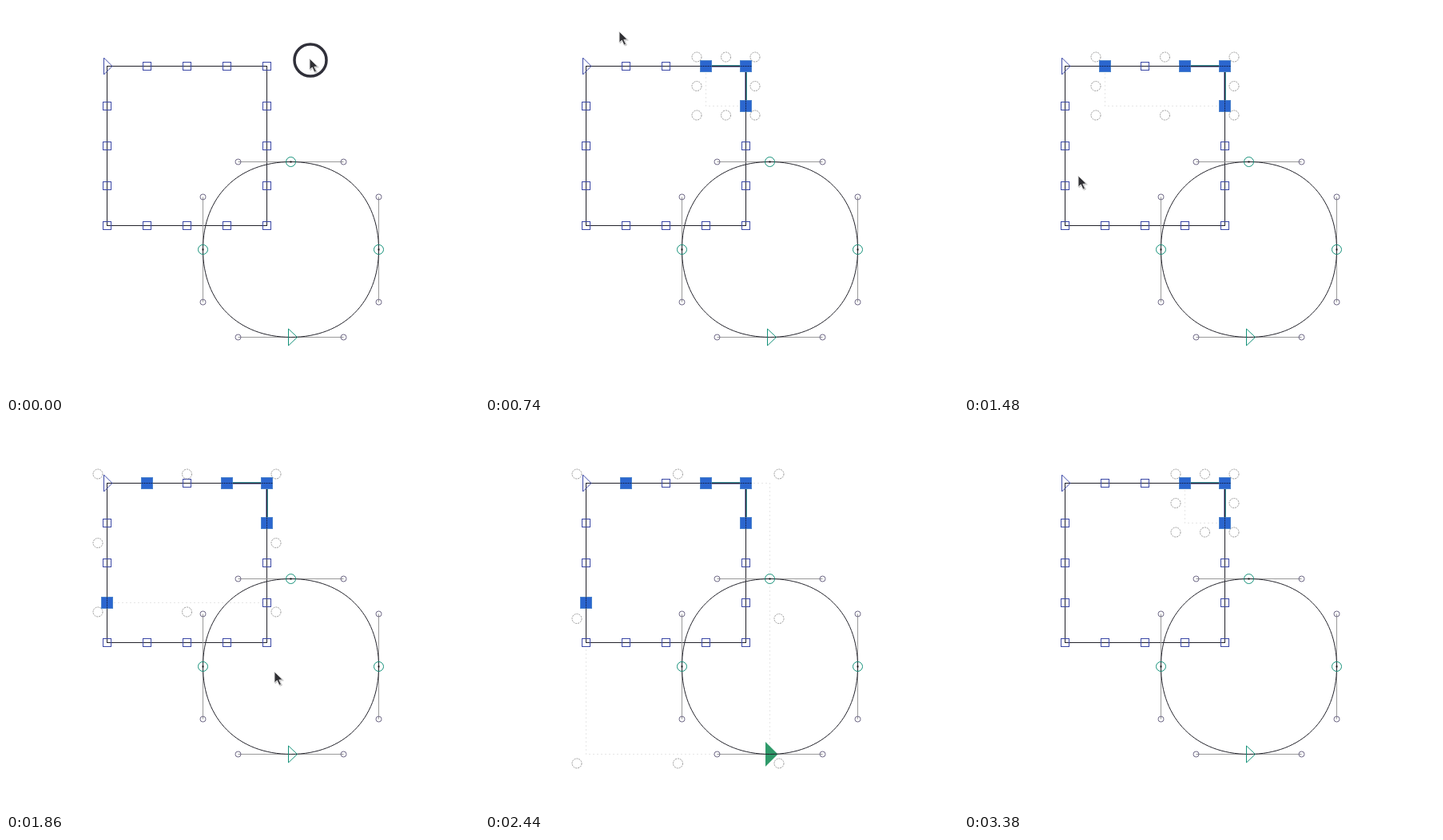
Animation of 592x488 px, one loop 3400 ms. Source, as an HTML page with a canvas:

```html
<!DOCTYPE html>
<html lang="en">
<head>
<meta charset="utf-8">
<title>Node selection</title>
<style>
html, body { margin: 0; width: 100%; height: 100%; overflow: hidden; background: #fff; }
canvas { display: block; width: 592px; height: 488px; }
</style>
</head>
<body>
<canvas id="stage" width="592" height="488"></canvas>
<script>
const ctx = document.getElementById('stage').getContext('2d');
const LOOP = 3400, FRAME = 20;
const BLUE = '#3b48a6', TEAL = '#129078', LINE = '#22222a', GREY = '#999';

const square = { x: 126.5, y: 75.5, step: 50, sides: 4 };
const round = { x: 356.5, y: 305.5, r: 110, handle: 66 };
const size = square.step * square.sides;
const right = square.x + size;

// Nodes in the order they are picked; the drag picks the first three.
const gridNode = (col, row) => [square.x + col * square.step, square.y + row * square.step];
const picks = [gridNode(3, 0), gridNode(4, 0), gridNode(4, 1), gridNode(1, 0), gridNode(0, 3),
               [round.x, round.y + round.r]];

const drag = { from: 60, to: 400, x: 386, y: 68 };
const clicks = [1040, 1600, 2160], CLICK_LAG = 20;
const UNDO = 2700, UNDO_GAP = 180;
const RING_TIME = 80;

// Pointer stops: time, x, y.
const stops = [
  [0, 380, 66], [320, 258, 148], [740, 168, 32], [1060, 175, 82], [1220, 161, 179],
  [1620, 136, 226], [1860, 336, 312], [2180, 340, 426], [2400, 352, 500]
];

function pointer(t) {
  const i = stops.findIndex(s => s[0] > t);
  if (i < 0) return null;
  const [t0, x0, y0] = stops[i - 1], [t1, x1, y1] = stops[i];
  const k = (t - t0) / (t1 - t0), e = k * k * (3 - 2 * k);
  return [x0 + (x1 - x0) * e, y0 + (y1 - y0) * e];
}

function pickedCount(t) {
  if (t < drag.to) return 0;
  const added = clicks.filter(c => t >= c + CLICK_LAG).length;
  const undone = t < UNDO ? 0 : 1 + Math.floor((t - UNDO) / UNDO_GAP);
  return 3 + Math.max(0, added - undone);
}

function poly(points, stroke, fill) {
  ctx.beginPath();
  points.forEach(([x, y]) => ctx.lineTo(x, y));
  ctx.closePath();
  if (fill) { ctx.fillStyle = fill; ctx.fill(); }
  if (stroke) { ctx.strokeStyle = stroke; ctx.stroke(); }
}

function line(x0, y0, x1, y1, color) {
  ctx.beginPath();
  ctx.moveTo(x0, y0);
  ctx.lineTo(x1, y1);
  ctx.strokeStyle = color;
  ctx.stroke();
}

function box(x, y, w, h, stroke, fill) {
  if (fill) { ctx.fillStyle = fill; ctx.fillRect(x, y, w, h); }
  if (stroke) { ctx.strokeStyle = stroke; ctx.strokeRect(x, y, w, h); }
}

function ring(x, y, r, color) {
  ctx.beginPath();
  ctx.arc(x, y, r, 0, Math.PI * 2);
  ctx.strokeStyle = color;
  ctx.stroke();
}

function dashed(pattern, paint) {
  ctx.setLineDash(pattern);
  paint();
  ctx.setLineDash([]);
}

// Start marker of a path.
function arrowhead(x, y, w, h, stroke, fill) {
  poly([[x, y - h], [x + w, y], [x, y + h]], stroke, fill);
}

function drawSquare() {
  const { x, y, sides } = square;
  box(x, y, size, size, LINE);
  for (let col = 0; col <= sides; col++) for (let row = 0; row <= sides; row++) {
    const edge = col % sides === 0 || row % sides === 0;
    if (!edge || col + row === 0) continue;
    const [nx, ny] = gridNode(col, row);
    box(nx - 5, ny - 5, 10, 10, BLUE);
  }
  arrowhead(x - 4, y, 10.5, 10.5, BLUE);
}

function drawRound(startPicked) {
  const { x, y, r, handle: h } = round;
  for (const s of [-r, r]) {
    line(x - h, y + s, x + h, y + s, GREY);
    line(x + s, y - h, x + s, y + h, GREY);
  }
  if (startPicked) arrowhead(x - 5.5, y + r, 15.5, 15.5, null, '#2f9a6a');

  ctx.beginPath();
  ctx.moveTo(x, y + r);
  for (let q = 1; q <= 4; q++) {
    const at = (turn, along, off) => {
      const a = (turn + 1) * Math.PI / 2, c = Math.cos(a), s = Math.sin(a);
      return [x + c * along - s * off, y + s * along + c * off];
    };
    ctx.bezierCurveTo(...at(q - 1, r, h), ...at(q, r, -h), ...at(q, r, 0));
  }
  ctx.strokeStyle = LINE;
  ctx.stroke();

  for (const s of [-r, r]) for (const q of [-h, h]) {
    ring(x + q, y + s, 3.5, '#6c6684');
    ring(x + s, y + q, 3.5, '#6c6684');
  }
  for (const [nx, ny] of [[x, y - r], [x - r, y], [x + r, y]]) {
    ring(nx, ny, 6, TEAL);
    box(nx - 1, ny - 1, 2, 2, null, '#111');
  }
  if (!startPicked) arrowhead(x - 3, y + r, 11, 10.5, TEAL);
}

function bounds(nodes) {
  const xs = nodes.map(n => n[0]), ys = nodes.map(n => n[1]);
  return [Math.min(...xs), Math.min(...ys), Math.max(...xs), Math.max(...ys)];
}

function drawBounds([l, t, r, b]) {
  dashed([1, 4], () => box(l, t, r - l, b - t, '#ccc'));
}

function drawHandles([l, t, r, b]) {
  const pad = 11.5;
  const xs = [l - pad, (l + r) / 2, r + pad], ys = [t - pad, (t + b) / 2, b + pad];
  dashed([2, 1], () => xs.forEach((x, i) => ys.forEach((y, j) => {
    if (i !== 1 || j !== 1) ring(x, y, 6, GREY);
  })));
}

function drawPicked(nodes) {
  const { y, step } = square;
  for (const [d, color] of [[1, '#3f9aa8'], [-1, '#8587b4']]) {
    line(right - step, y - d, right + d, y - d, color);
    line(right + d, y - d, right + d, y + step, color);
  }
  for (const [nx, ny] of nodes.slice(0, 5)) {
    box(nx - 7, ny - 7, 14, 14, '#4b83cc', '#2b66cf');
    const [dx, dy] = ny > y ? [0, 7] : [7, 0];
    dashed([2, 1], () => line(nx - dx, ny - dy, nx + dx, ny + dy, '#14234f'));
  }
}

function drawBand(x, y) {
  const l = Math.round(x) + .5, b = Math.round(y) + 1.5, t = drag.y + .5;
  box(l, t, drag.x + .5 - l, b - t, 'rgba(80,150,190,.35)', 'rgba(150,154,252,.5)');
}

function drawPointer(x, y) {
  const shape = [[0, 0], [0, 14], [3.3, 11], [6, 17], [8.5, 16], [5.8, 10.3], [10.3, 10]];
  const placed = d => shape.map(([a, b]) => [a + d + Math.round(x), b + d + Math.round(y)]);
  poly(placed(1), '#ccc', '#ccc');
  poly(placed(0), '#ddd', '#303034');
}

function draw(t) {
  const nodes = picks.slice(0, pickedCount(t)), extent = bounds(nodes);
  box(0, 0, 592, 488, null, '#fff');
  ctx.lineWidth = 1;
  if (nodes.length) drawBounds(extent);
  drawSquare();
  drawRound(nodes.length === picks.length);
  if (nodes.length) {
    drawPicked(nodes);
    drawHandles(extent);
  }

  const at = pointer(t);
  if (!at) return;
  if (t >= drag.from && t < drag.to) drawBand(...at);
  drawPointer(...at);
  // The drag's press ring ends as the loop begins.
  const pressed = [-RING_TIME, ...clicks].find(c => t >= c && t <= c + RING_TIME);
  if (pressed !== undefined) {
    ctx.lineWidth = 3.5;
    ring(at[0] + 1, at[1] + 2, 60 - 40 * (t - pressed) / RING_TIME, '#30303a');
  }
}

function tick() {
  draw(Math.floor(performance.now() % LOOP / FRAME) * FRAME);
  requestAnimationFrame(tick);
}
tick();
</script>
</body>
</html>
```
